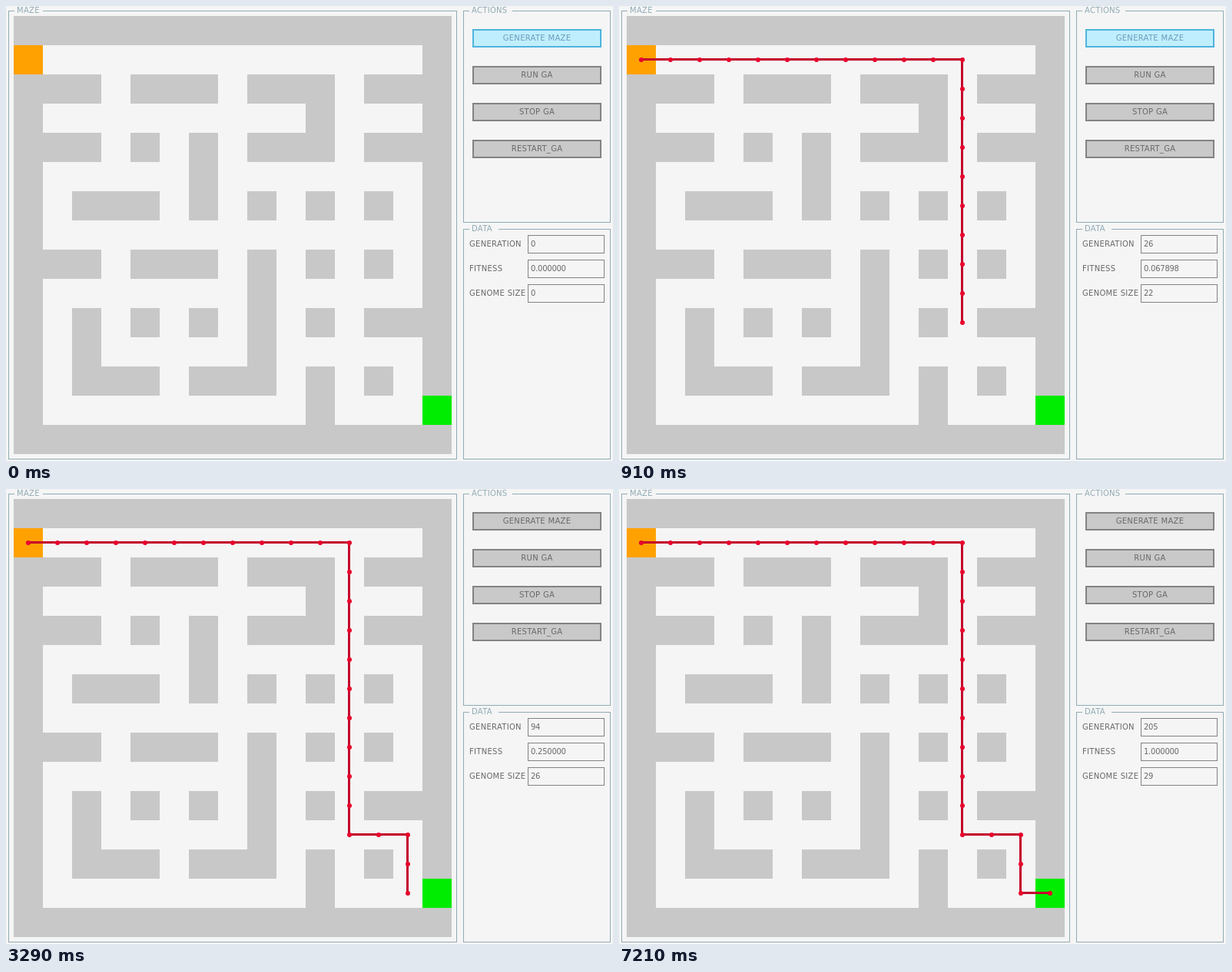
Animation of 790 by 592 pixels, one loop 7420 ms. Source, as an HTML page with a canvas:

```html
<!DOCTYPE html>
<html lang="en">
<head>
<meta charset="utf-8">
<title>Maze GA</title>
<style>
  html, body { margin: 0; width: 100%; height: 100%; overflow: hidden; background: #f5f5f5; }
  canvas { display: block; }
</style>
</head>
<body>
<canvas id="stage" width="790" height="592"></canvas>
<script>
const ctx = document.getElementById('stage').getContext('2d');

const STEP = 70, LAST = 103, LOOP = 7420;
const CELL = 38, LEFT = 10, TOP = 13;
const START = [0, 1], GOAL = [14, 13];

const MAZE = [
  '###############',
  '..............#',
  '###.###.###.###',
  '#.........#...#',
  '###.#.#.###.###',
  '#.....#.......#',
  '#.###.#.#.#.#.#',
  '#.............#',
  '###.###.#.#.#.#',
  '#.......#.....#',
  '#.#.#.#.#.#.###',
  '#.#.....#.....#',
  '#.###.###.#.#.#',
  '#.........#...#',
  '###############'
];

const COLOR = {
  back: '#f5f5f5', wall: '#c8c8c8', start: '#ffa100', goal: '#00ec00',
  route: '#c3002b', dot: '#e8002c', frame: '#90abb5', border: '#838383', text: '#686868'
};
const NORMAL = { fill: '#c9c9c9', border: '#838383', text: '#686868' };
const HOVER = { fill: '#bfefff', border: '#4fb4dc', text: '#6c9bbc' };
const HOVER_END = 17;

// Best genome from a given step on; moves read as right/down runs
const BEST = [
  { from: 0, size: 0, moves: '' },
  { from: 1, size: 20, moves: 'R7 D6 R2 D1' },
  { from: 8, size: 22, moves: 'R11 D9' },
  { from: 17, size: 25, moves: 'R11 D12 R1' },
  { from: 28, size: 26, moves: 'R11 D10 R2 D2' },
  { from: 103, size: 29, moves: 'R11 D10 R2 D2 R1' }
];

function walk(moves) {
  let [x, y] = START;
  const cells = [[x, y]];
  for (const run of moves.split(' ')) {
    for (let n = +run.slice(1); n > 0; n--) {
      if (run[0] === 'R') x++; else y++;
      cells.push([x, y]);
    }
  }
  return cells;
}

function fitness(cells, size) {
  if (!size) return 0;
  const [x, y] = cells[cells.length - 1];
  const dist = Math.hypot(GOAL[0] - x, GOAL[1] - y);
  return dist ? 1 / (3 * dist + size - cells.length + 1) : 1;
}

for (const b of BEST) {
  b.cells = b.size ? walk(b.moves) : [];
  b.fitness = fitness(b.cells, b.size);
}

function rect(x, y, w, h, color) {
  ctx.fillStyle = color;
  ctx.fillRect(x, y, w, h);
}

function box(x, y, w, h, line, border, fill) {
  rect(x, y, w, h, border);
  rect(x + line, y + line, w - 2 * line, h - 2 * line, fill);
}

function text(str, x, y, color, align = 'left', spacing = 0.3) {
  ctx.font = '10px "DejaVu Sans", sans-serif';
  ctx.letterSpacing = spacing + 'px';
  ctx.textAlign = align;
  ctx.fillStyle = color;
  ctx.fillText(str, x, y);
}

function group(title, x, y, w, h, gap) {
  box(x, y, w, h, 1, COLOR.frame, COLOR.back);
  rect(x + 8, y, gap, 1, COLOR.back);
  text(title, x + 11, y + 3, COLOR.frame);
}

function button(label, y, look) {
  box(607, y, 168, 24, 2, look.border, look.fill);
  text(label, 691, y + 15, look.text, 'center');
}

function field(label, value, y) {
  text(label, 603, y + 15, COLOR.text);
  box(679, y, 100, 24, 1, COLOR.border, COLOR.back);
  text(value, 683, y + 15, COLOR.text, 'left', -0.25);
}

function cell(x, y, color) {
  rect(LEFT + x * CELL, TOP + y * CELL, CELL, CELL, color);
}

function route(cells) {
  if (!cells.length) return;
  const points = cells.map(([x, y]) => [LEFT + (x + 0.5) * CELL, TOP + (y + 0.5) * CELL]);
  ctx.strokeStyle = COLOR.route;
  ctx.lineWidth = 3;
  ctx.beginPath();
  for (const [x, y] of points) ctx.lineTo(x - 0.5, y - 0.5);
  ctx.stroke();
  ctx.fillStyle = COLOR.dot;
  for (const [x, y] of points) {
    ctx.beginPath();
    ctx.arc(x, y, 3, 0, Math.PI * 2);
    ctx.fill();
  }
}

function draw(step) {
  const best = BEST.filter(b => b.from <= step).pop();
  rect(0, 0, 790, 592, COLOR.back);

  group('MAZE', 3, 6, 584, 584, 37);
  MAZE.forEach((row, y) => {
    for (let x = 0; x < row.length; x++) if (row[x] === '#') cell(x, y, COLOR.wall);
  });
  cell(...START, COLOR.start);
  cell(...GOAL, COLOR.goal);
  route(best.cells);

  group('ACTIONS', 595, 6, 192, 276, 56);
  button('GENERATE MAZE', 30, step < HOVER_END ? HOVER : NORMAL);
  button('RUN GA', 78, NORMAL);
  button('STOP GA', 126, NORMAL);
  button('RESTART_GA', 174, NORMAL);

  group('DATA', 595, 290, 192, 300, 38);
  field('GENERATION', String(Math.min(205, step * 2)), 298);
  field('FITNESS', best.fitness.toFixed(6), 330);
  field('GENOME SIZE', String(best.size), 362);
}

const begin = performance.now();
let shown = -1;

function tick() {
  const t = Math.max(0, performance.now() - begin) % LOOP;
  const step = Math.min(LAST, Math.floor(t / STEP));
  if (step !== shown) draw(shown = step);
  requestAnimationFrame(tick);
}
tick();
</script>
</body>
</html>
```
